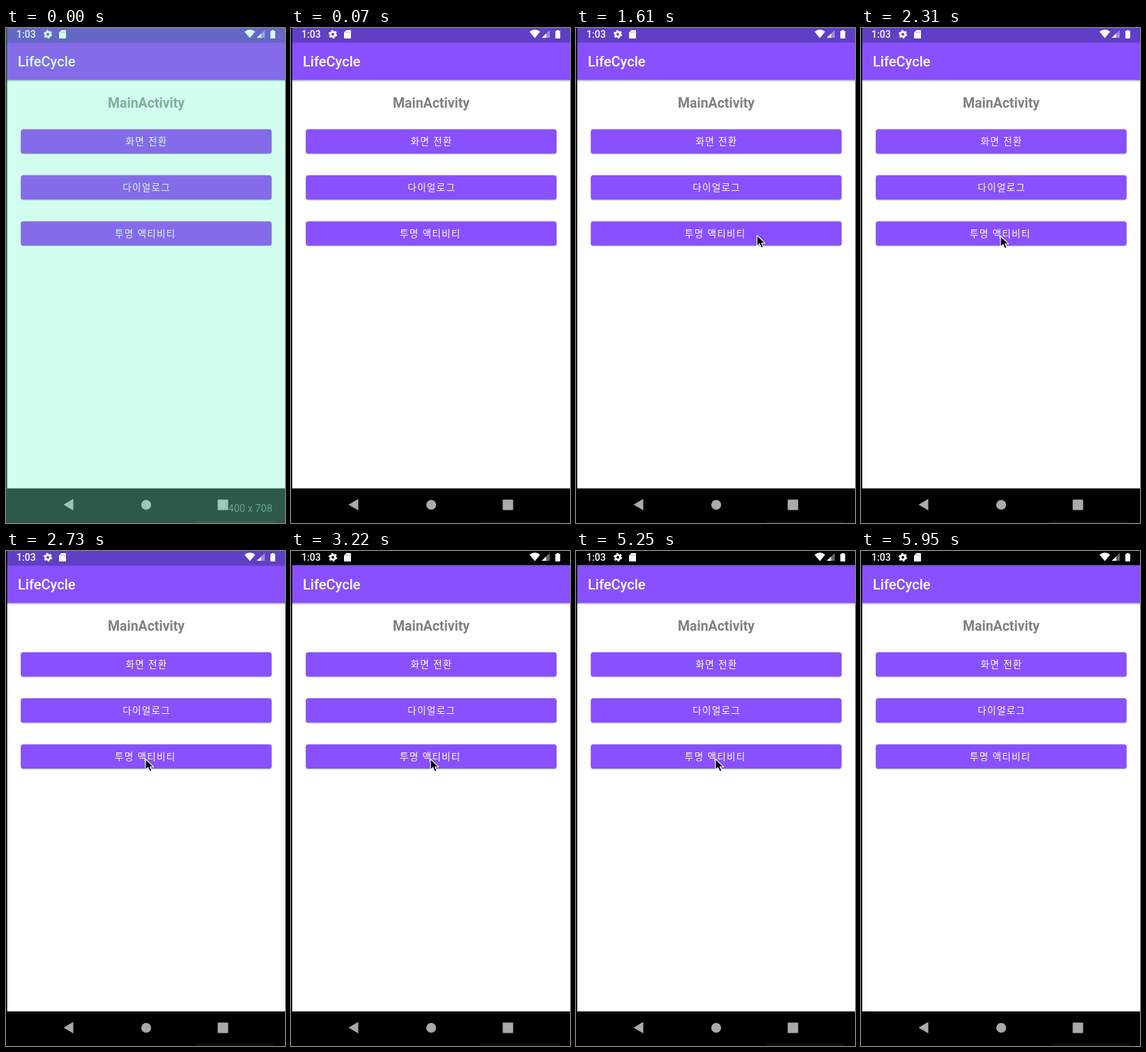
Write an HTML page that moves like this. It is 400x708 px and loops after 6.37 s.

```html
<!DOCTYPE html>
<html lang="ko">
<head>
<meta charset="utf-8">
<title>LifeCycle</title>
<style>
  html, body { margin: 0; width: 100%; height: 100%; overflow: hidden; background: #000; }
  svg { display: block; width: 400px; height: 708px; }
  text { font-family: Roboto, "Noto Sans", sans-serif; fill: #fff; white-space: pre; }
  .label { font: 400 13.6px "Noto Sans CJK KR", "Noto Sans CJK", "Noto Sans CJK JP", sans-serif; letter-spacing: 1.22px; }
  .purple { fill: #8850ff; }
  #status { fill: #5f3fc4; }
  .selecting .purple { fill: #891cf3; }
  .selecting #status { fill: #5816bc; }
  #select { display: none; }
  .selecting #select { display: inline; }
</style>
</head>
<body>
<svg id="stage" viewBox="0 0 400 708">
  <defs>
    <linearGradient id="shade" x2="0" y2="1">
      <stop stop-color="#000" stop-opacity=".25"/>
      <stop offset="1" stop-color="#000" stop-opacity="0"/>
    </linearGradient>
  </defs>

  <rect width="400" height="708" fill="#fff"/>
  <rect class="purple" y="20" width="400" height="54.5"/>
  <rect y="74.5" width="400" height="3" fill="url(#shade)"/>
  <rect id="status" width="400" height="20"/>
  <rect y="20" width="400" height="2" fill="url(#shade)"/>
  <text x="17" y="55" font-size="20" font-weight="500">LifeCycle</text>
  <text x="201" y="114" font-size="19.5" font-weight="700" text-anchor="middle" style="fill:#808080">MainActivity</text>
  <g id="buttons"></g>

  <g fill="#fff">
    <text x="15" y="14" font-size="14" font-weight="500">1:03</text>
    <g fill="none" stroke="#fff">
      <circle cx="60" cy="9" r="3.4" stroke-width="2.8"/>
      <circle cx="60" cy="9" r="5.3" stroke-width="1.7" stroke-dasharray="2.7 2.85"/>
    </g>
    <path d="M79.5 3H85q1 0 1 1v10q0 1-1 1h-8q-1 0-1-1V6.5z"/>
    <path d="M79.7 5v2.4M81.8 5v2.4M83.9 5v2.4" stroke="#5f3fc4" stroke-width=".8" opacity=".6"/>
    <path d="M349.6 14.5L342 5.2Q349.6-.8 357.2 5.2z"/>
    <path d="M371 3v11h-11.5z" opacity=".4"/>
    <path d="M365.8 8v6h-6.3z"/>
    <path d="M381 4V3h3v1h1.2q.8 0 .8.8v9.4q0 .8-.8.8h-5.4q-.8 0-.8-.8V4.800q0-.8.8-.8z"/>
  </g>

  <rect y="658.500" width="400" height="49.5"/>
  <rect width="1.7" height="708"/>
  <rect x="272" y="705.500" width="113" height="1.500" fill="#161616"/>
  <g fill="#aaa">
    <path d="M82.500 681.700L96.500 673.500V690z"/>
    <circle cx="201" cy="682" r="7.100"/>
    <rect x="303.500" y="674.500" width="15" height="15" rx="1"/>
  </g>

  <path id="cursor" d="M0 0V15.500L3.600 12.200L6.200 18L9 16.800L6.500 11.200H11.500z"
        stroke="#fff" stroke-width="1.100" stroke-linejoin="round"/>

  <g id="select">
    <rect width="400" height="708" fill="#7fffd4" opacity=".35"/>
    <text x="318.500" y="692" font-size="14.500" style="fill:#6ba38c">400 x 708</text>
  </g>
</svg>
<script>
  const LOOP = 6370, STEP = 70;
  const $ = id => document.getElementById(id);

  const buttons = [["화면 전환", 171.5, 144.7], ["다이얼로그", 167.3, 210.6], ["투명 액티비티", 156, 276.4]];
  $("buttons").innerHTML = buttons.map(([name, x, y]) => `
    <rect x="21" y="${y + .8}" width="360" height="35" rx="4" opacity=".3"/>
    <rect class="purple" x="21.3" y="${y}" width="359.4" height="34.7" rx="3.5"/>
    <text class="label" x="${x}" y="${y + 22.3}">${name}</text>`).join("");

  // time, x, y of the pointer tip
  const path = [
    [210, 402, 470], [700, 272, 302], [1260, 259.5, 296.5],
    [1960, 259.5, 296.5], [2310, 200, 297.5],
    [5250, 200, 297.5], [5810, -16, 450]
  ];
  // time, status bar colour
  const bar = [[0, ""], [2800, "#2f2062"], [2870, "#000"]];

  const ease = k => k * k * (3 - 2 * k);

  function pointer(t) {
    const i = path.findIndex(p => p[0] > t);
    if (i < 1) return null;
    const [t0, x0, y0] = path[i - 1], [t1, x1, y1] = path[i];
    const k = ease((t - t0) / (t1 - t0));
    return [x0 + (x1 - x0) * k, y0 + (y1 - y0) * k];
  }

  function draw(time) {
    const t = Math.floor((time % LOOP) / STEP) * STEP;
    const at = pointer(t);
    $("stage").classList.toggle("selecting", t < STEP);
    $("status").style.fill = bar.filter(b => b[0] <= t).pop()[1];
    $("cursor").style.display = at ? "" : "none";
    if (at) $("cursor").setAttribute("transform", `translate(${at})`);
  }

  const start = performance.now();
  (function tick() {
    draw(performance.now() - start);
    requestAnimationFrame(tick);
  })();
</script>
</body>
</html>
```
